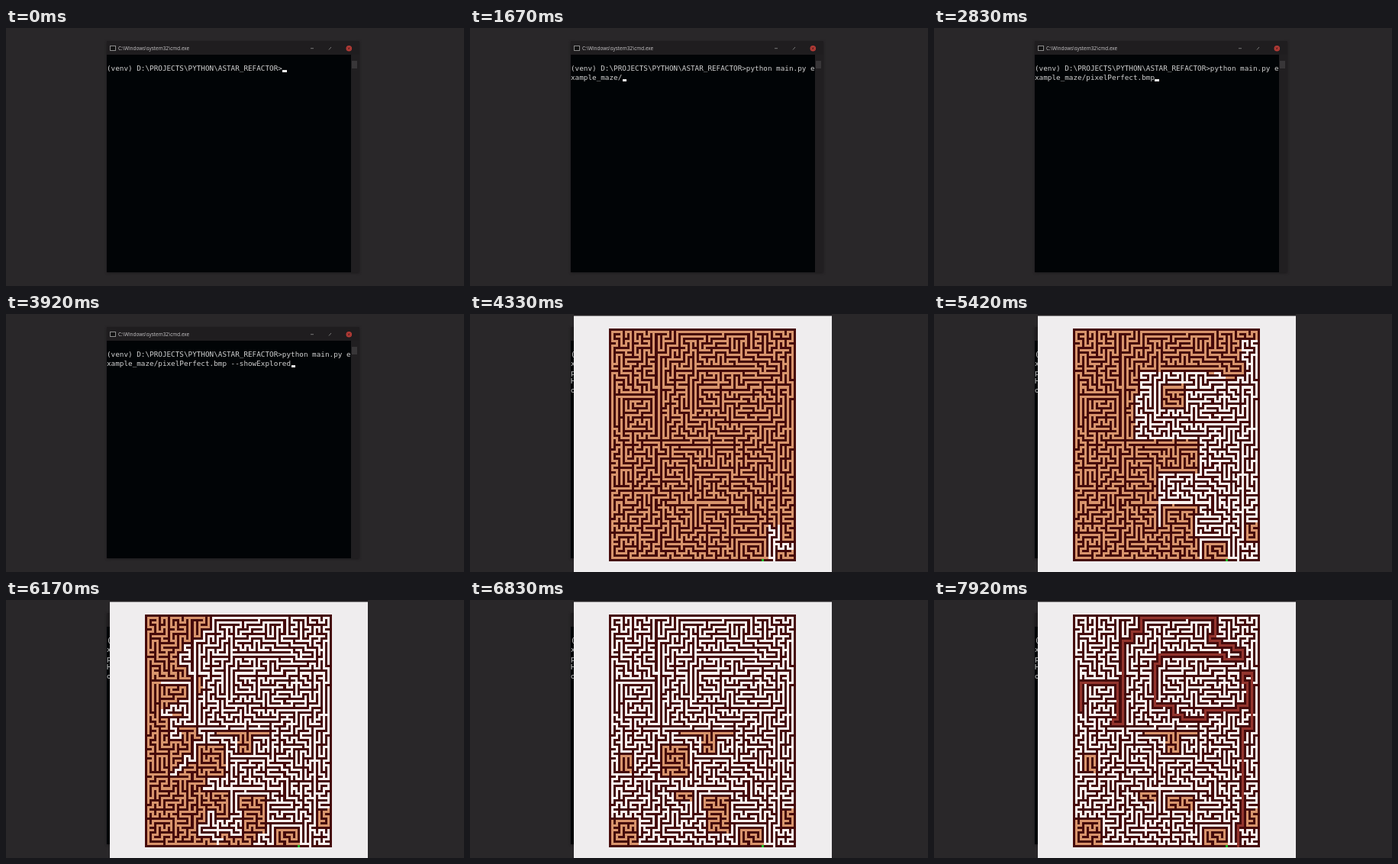
Write an HTML page with a canvas that moves like this. It is 600x338 px and loops after 8 s.

```html
<!DOCTYPE html>
<html lang="en">
<head>
<meta charset="utf-8">
<title>Maze solver</title>
<style>
  html, body { margin: 0; width: 100%; height: 100%; overflow: hidden; background: #292729; }
  #stage { position: absolute; left: 0; top: 0; width: 600px; height: 338px; overflow: hidden; background: #292729; }
  #stage > * { position: absolute; }
  #term { left: 132px; top: 17px; width: 331px; height: 303px; background: #211f21; box-shadow: 0 1px 3px #1c1a1c; }
  #term > * { position: absolute; }
  #bar { left: 0; top: 0; width: 331px; height: 18px; background: #1f1d1f; }
  #body { left: 0; top: 18px; width: 320px; height: 285px; background: #010406; }
  #thumb { left: 321px; top: 26px; width: 7px; height: 10px; background: #383638; }
  #title { left: 15px; top: 5px; font: 6.4px/9px "Open Sans", sans-serif; color: #c9c7c9; white-space: pre; }
  #bar svg { position: absolute; left: 0; top: 0; }
  #text { margin: 0; left: 0; top: 30px; font: 9.32px/11.8px "DejaVu Sans Mono", monospace; color: #d2d2d2; white-space: pre; }
  #cursor { width: 5.6px; height: 2.6px; background: #f2f2f2; }
  #view { left: 0; top: 0; }
</style>
</head>
<body>
<div id="stage">
  <div id="term">
    <div id="bar">
      <svg width="331" height="18" fill="none">
        <rect x="4.5" y="6.5" width="7" height="6" fill="#111" stroke="#8c8c8c"/>
        <path d="M267 9.7h4" stroke="#777"/>
        <path d="M291 11.5l3-3.5" stroke="#777"/>
        <circle cx="317.3" cy="9.7" r="3.8" fill="#b23b36"/>
        <path d="M315.8 8.2l3 3m0-3l-3 3" stroke="#4a1a1a" stroke-width=".8"/>
      </svg>
    </div>
    <div id="title">C:\Windows\system32\cmd.exe</div>
    <div id="body"></div>
    <div id="thumb"></div>
    <pre id="text"></pre>
    <div id="cursor"></div>
  </div>
  <canvas id="view" width="600" height="338"></canvas>
</div>
<script>
const LOOP = 8000, FPS = 12;
const W = 40, H = 50, COLS = 57, CHAR = 5.61, LINE = 11.8;
const WALL = '#450a0b', FLOOR = '#d8946c', SEEN = '#f8f2f0', ROUTE = '#93352e';
const ENTER = 48, OUTPUT = 50, OPEN = 51;

// ---- terminal ----
const PROMPT = '(venv) D:\\PROJECTS\\PYTHON\\ASTAR_REFACTOR>';
const COMMAND = 'python main.py example_maze/pixelPerfect.bmp --showExplored';
const REPLY = ['pygame 1.9.6', 'Hello from the pygame community. https://www.pygame.org/contribute.html'];
const PAUSES = [16, 21, 29];

const $ = id => document.getElementById(id);
const wrap = s => s.match(new RegExp(`.{1,${COLS}}`, 'g'));

// a little slower after the folder name
function typed(frame) {
  const n = frame - PAUSES.filter(p => p <= frame).length;
  return Math.round(n <= 19 ? n * 28 / 19 : 28 + (n - 19) * 31 / 24);
}

function drawTerminal(frame) {
  const line = PROMPT + COMMAND.slice(0, typed(frame));
  let rows = wrap(line);
  if (frame >= OUTPUT) rows = rows.concat(...REPLY.map(wrap));
  $('text').textContent = rows.join('\n');
  let row = Math.floor(line.length / COLS), col = line.length % COLS;
  if (frame >= ENTER) { row = rows.length; col = 0; }
  const cur = $('cursor').style;
  cur.display = frame >= OPEN ? 'none' : 'block';
  cur.left = col * CHAR + .3 + 'px';
  cur.top = 38.3 + row * LINE + 'px';
}

// ---- maze ----
let seed = 20417;
function rnd() {
  seed = seed + 0x6D2B79F5 | 0;
  let t = Math.imul(seed ^ seed >>> 15, 1 | seed);
  t = t + Math.imul(t ^ t >>> 7, 61 | t) ^ t;
  return ((t ^ t >>> 14) >>> 0) / 4294967296;
}

// cell areas [left, top, right, bottom] by when the search gets there
const NEVER = [[15, 25, 26, 25], [20, 26, 22, 29], [2, 30, 4, 33], [14, 38, 17, 39],
  [20, 39, 25, 41], [0, 44, 5, 49], [37, 42, 39, 45], [28, 46, 32, 49]];
const LATE = [[11, 28, 16, 34], [21, 42, 25, 46]];
const FIRST = [[31, 36, 39, 39], [26, 40, 35, 44], [34, 31, 36, 49], [36, 46, 39, 49]];
const POCKET = [[19, 12, 23, 16]];
const RIGHT = [[36, 2, 39, 12], [14, 9, 39, 13], [13, 14, 39, 23], [27, 24, 39, 49], [18, 31, 39, 37], [18, 38, 18, 42]];
const ZONES = [[5, NEVER], [4, LATE], [1, FIRST], [3, POCKET], [2, RIGHT]];

// zone n is explored from TIMES[n - 1] to TIMES[n]
const TIMES = [4290, 4500, 5420, 6830, 7290];
const ROUTE_START = 7290, ROUTE_END = 7916;
// corners of the route; each leg runs across, then up or down
const BENDS = [[35, 49], [35, 45], [36, 24], [38, 12], [36, 14], [37, 19], [35, 20], [28, 22],
  [23, 21], [21, 19], [17, 10], [18, 8], [32, 9], [36, 7], [34, 6], [31, 5], [29, 4], [30, 0],
  [14, 3], [12, 5], [10, 23], [8, 22], [9, 14], [1, 20]];

function zoneOf(x, y) {
  const hit = ZONES.find(([, rects]) => rects.some(([a, b, c, d]) => x >= a && x <= c && y >= b && y <= d));
  return hit ? hit[0] : 3;
}

const grid = [];
for (let y = 0; y < H; y++) {
  for (let x = 0; x < W; x++) grid.push({ x, y, zone: zoneOf(x, y), stage: 0, from: null, time: Infinity });
}
const at = (x, y) => x >= 0 && y >= 0 && x < W && y < H ? grid[y * W + x] : null;
const around = c => [at(c.x, c.y - 1), at(c.x, c.y + 1), at(c.x - 1, c.y), at(c.x + 1, c.y)];

function carve(cell, from, stage) {
  const base = stage < 3 ? H - cell.y : cell.y + (W - cell.x) * .3;
  cell.from = from;
  cell.stage = stage;
  cell.key = from && from.stage === stage ? Math.max(from.key + .5, base) : base;
}

function layRoute() {
  let cell = at(...BENDS[0]);
  carve(cell, null, 1);
  const cells = [cell];
  for (const [x, y] of BENDS) {
    while (cell.x !== x || cell.y !== y) {
      const dx = Math.sign(x - cell.x);
      const next = at(cell.x + dx, cell.y + (dx ? 0 : Math.sign(y - cell.y)));
      carve(next, cell, Math.max(cell.stage, Math.min(next.zone, 3)));
      cells.push(cell = next);
    }
  }
  return cells;
}

function growMaze() {
  for (let stage = 1; stage <= 5; stage++) {
    const live = grid.filter(c => c.stage && c.stage <= stage);
    while (live.length) {
      const n = rnd() < .86 ? live.length - 1 : Math.floor(rnd() * live.length);
      const free = around(live[n]).filter(c => c && !c.stage && c.zone <= stage);
      if (!free.length) { live.splice(n, 1); continue; }
      const next = free[Math.floor(rnd() * free.length)];
      carve(next, live[n], stage);
      live.push(next);
    }
  }
}

function timeCells() {
  for (let stage = 1; stage < 5; stage++) {
    const list = grid.filter(c => c.stage === stage).sort((a, b) => a.key - b.key);
    const t0 = TIMES[stage - 1], span = TIMES[stage] - t0;
    list.forEach((c, n) => c.time = t0 + span * (n + 1) / list.length);
  }
}

const route = layRoute();
growMaze();
timeCells();

const tile = document.createElement('canvas');
tile.width = 2 * W + 1;
tile.height = 2 * H + 1;
const ink = tile.getContext('2d');
const ctx = $('view').getContext('2d');

function paint(c, color) {
  ink.fillStyle = color;
  ink.fillRect(2 * c.x + 1, 2 * c.y + 1, 1, 1);
  if (c.from) ink.fillRect(c.x + c.from.x + 1, c.y + c.from.y + 1, 1, 1);
  else ink.fillRect(2 * c.x + 1, 2 * c.y + 2, 1, 1);
}

function drawMaze(t) {
  ink.fillStyle = WALL;
  ink.fillRect(0, 0, tile.width, tile.height);
  for (const c of grid) paint(c, c.time <= t + .01 ? SEEN : FLOOR);
  const part = Math.min(1, Math.max(0, (t - ROUTE_START) / (ROUTE_END - ROUTE_START)));
  route.slice(0, Math.round(part * route.length)).forEach(c => paint(c, ROUTE));

  ctx.fillStyle = '#1f1d20';
  ctx.fillRect(136, 0, 338, 3);
  ctx.fillStyle = '#efedee';
  ctx.fillRect(136, 2.5, 338, 336);
  ctx.imageSmoothingEnabled = false;
  ctx.drawImage(tile, 182, 19, 245, 305);
  ctx.fillStyle = '#1fbf2a';
  ctx.fillRect(382, 321, 3, 3);
}

// ---- playback ----
let last = -1;
function tick() {
  const frame = Math.floor((performance.now() % LOOP + 3.4) * FPS / 1000) % (LOOP * FPS / 1000);
  if (frame !== last) {
    last = frame;
    drawTerminal(frame);
    ctx.clearRect(0, 0, 600, 338);
    if (frame >= OPEN) drawMaze(frame * 1000 / FPS);
  }
  requestAnimationFrame(tick);
}
tick();
</script>
</body>
</html>
```
